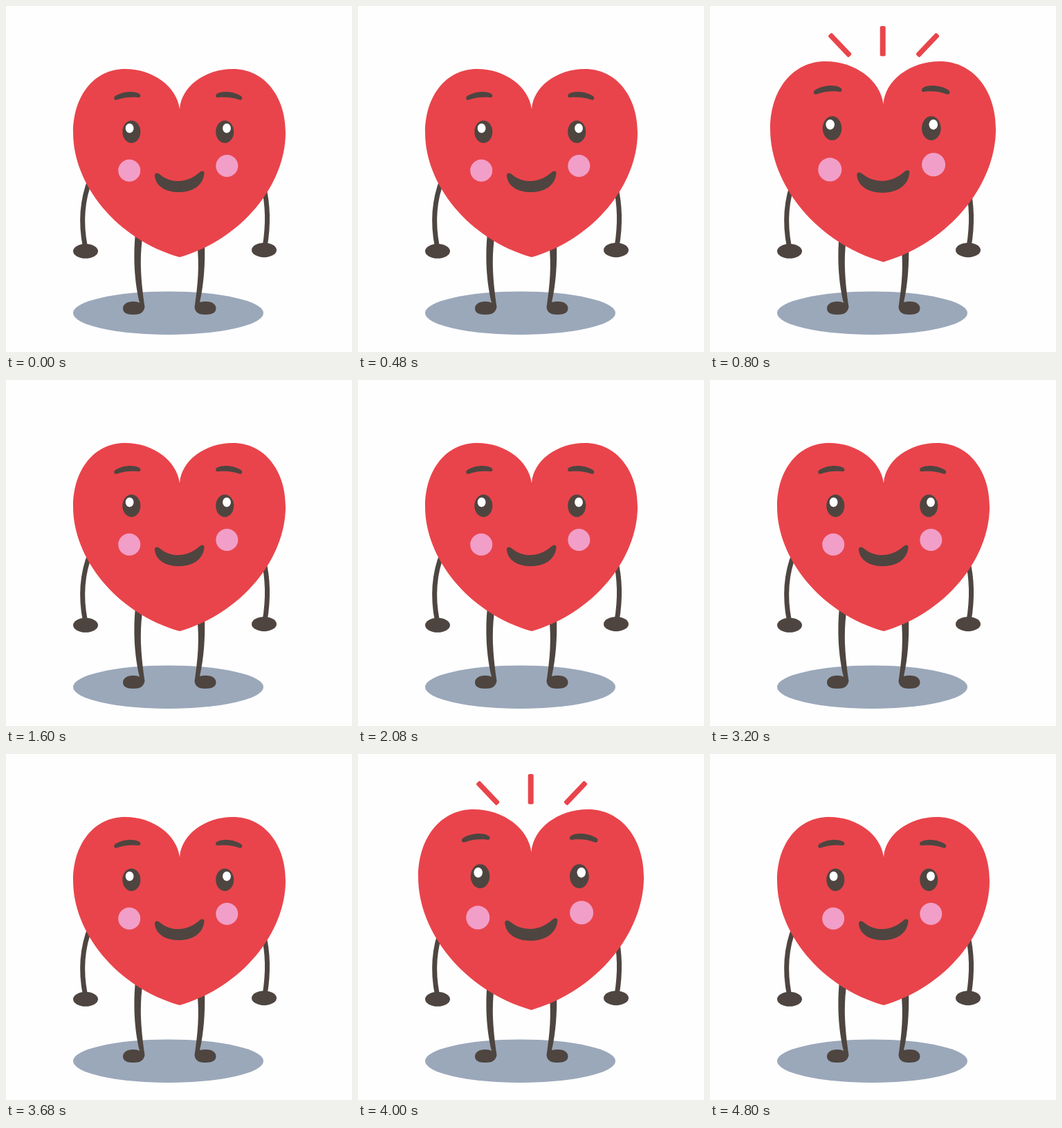
Animation of 500x500 px, one loop 5.6 s. Source, as an HTML page:

```html
<!DOCTYPE html>
<html lang="en">
<head>
<meta charset="utf-8">
<title>Beating heart</title>
<style>
  html, body { margin: 0; width: 100%; height: 100%; overflow: hidden; background: #fefefe; }
  svg { display: block; width: 100vw; height: 100vh; }
  .red { fill: #e9444b; }
  .dark { fill: #4e4540; }
  .white { fill: #fff; }
  .pink { fill: #f19fc8; }
  .arm { fill: none; stroke: #4e4540; stroke-width: 7; }
</style>
</head>
<body>
<svg viewBox="0 0 500 500">
  <ellipse cx="234.5" cy="443.7" rx="137.5" ry="31.2" fill="#9ba8ba"/>

  <g id="limbs">
    <path class="arm" d="M122 250Q104 295 114.500 348"/>
    <path class="arm" d="M372 260Q382 300 374 348"/>
    <g class="dark">
      <ellipse cx="115" cy="354.3" rx="18" ry="10.500"/>
      <ellipse cx="373" cy="352.7" rx="18" ry="10.500"/>
      <path d="M187 328H198C193 362 194 390 200.500 435C199 443 194 446 184 446C174 446 169 443 169 437C169 431 175 427 184 427Q190 427 193 429C187 404 183 370 187 328Z"/>
      <path d="M276 342H287C288 372 286 402 280 428Q284 427 289 427C298 427 303.500 431 303.500 437C303.500 443 298 446 288 446C279 446 273 443 272.500 435C277 405 280 376 276 342Z"/>
    </g>
  </g>

  <g id="body">
    <path class="red" d="M251 149C247 117 213 91 172 91C128 91 97 129 97 183C97 258 160 337 251 363C341 337 404 258 404 183C404 129 372 91 328 91C287 91 253 117 251 149Z"/>
    <g class="dark">
      <path id="brow" d="M159.500 135.800C156 136.500 155 132 158 130C168 123 186 122 193 127C196 130 194 133 190 132C179 131 170 132 159.500 135.800Z"/>
      <use href="#brow" transform="matrix(-1 0 0 1 497.500 0)"/>
      <ellipse cx="181.3" cy="181.7" rx="13" ry="16.300"/>
      <ellipse cx="316.2" cy="181.7" rx="13" ry="16.300"/>
      <path d="M215 246C214 241 219 240 223 244C239 257 262 256 279 241C283 237 287 238 286.500 242C285 259 270 269 250 269C231 269 217 261 215 246Z"/>
    </g>
    <g class="white">
      <ellipse cx="178.6" cy="176.700" rx="5.900" ry="6.900"/>
      <ellipse cx="319" cy="176.700" rx="5.900" ry="6.900"/>
    </g>
    <g class="pink">
      <circle cx="178.2" cy="237.700" r="16"/>
      <circle cx="319.3" cy="231" r="16"/>
    </g>
  </g>

  <g id="rays" class="red">
    <rect x="245.700" y="29" width="8" height="43.500" rx="2"/>
    <rect x="-3.700" y="-21.500" width="7.400" height="43" rx="2" transform="translate(187.700 56.500) rotate(-43.500)"/>
    <rect x="-3.700" y="-21.500" width="7.400" height="43" rx="2" transform="translate(314.500 56.500) rotate(43.500)"/>
  </g>
</svg>
<script>
  const STEP = 800, STEPS = 7;
  const body = document.getElementById('body');
  const rays = document.getElementById('rays');
  const start = performance.now();

  function draw(now) {
    const step = Math.floor(Math.max(0, now - start) / STEP) % STEPS;
    const swollen = step % 2 === 1;
    body.setAttribute('transform', swollen ? 'matrix(1.062 0 0 1.066 -16 -17)' : '');
    rays.setAttribute('visibility', swollen ? 'visible' : 'hidden');
    requestAnimationFrame(draw);
  }
  draw(start);
</script>
</body>
</html>
```
